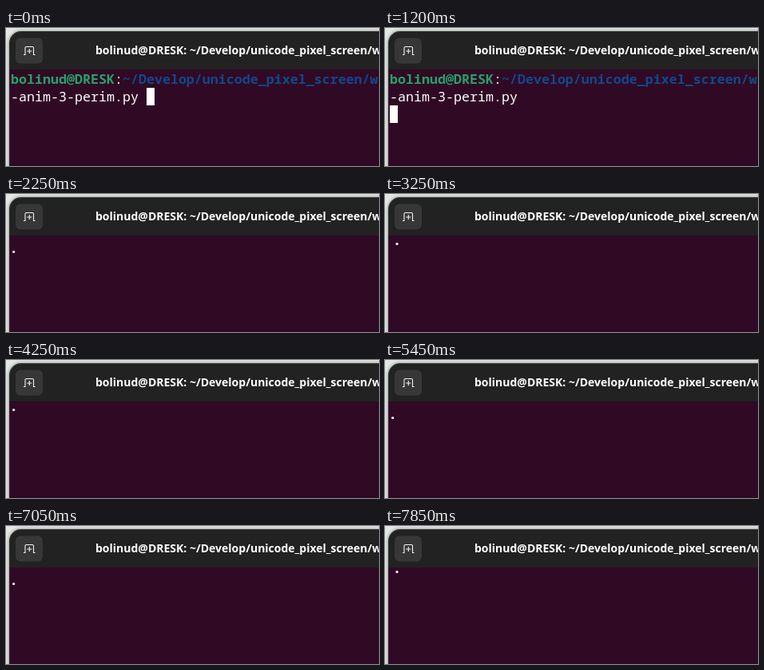
Animation of 467x173 px, one loop 8000 ms. Source, as an HTML page:

```html
<!DOCTYPE html>
<html lang="en">
<head>
<meta charset="utf-8">
<title>Terminal perimeter animation</title>
<style>
  html, body { margin: 0; width: 100%; height: 100%; overflow: hidden; background: #e3e8e5; }
  svg { display: block; width: 467px; height: 173px; }
  text { white-space: pre; fill: #fff; }
  .title { font: 700 14px "Noto Sans", "Open Sans", sans-serif; }
  .mono { font: 16.667px "Noto Sans Mono", "DejaVu Sans Mono", monospace; }
  .bold { font-weight: 700; }
  .user { fill: #26a269; }
  .path { fill: #12488b; }
  .window { filter: drop-shadow(0 0 2px rgba(0, 0, 0, .45)); }
</style>
</head>
<body>
<svg viewBox="0 0 467 173">
  <rect class="window" x="4" y="4" width="490" height="200" rx="15" fill="#222"/>
  <path d="M4 52H467V173H4z" fill="#300a24"/>
  <rect x="4.5" y="4.5" width="489" height="199" rx="14.5" fill="none" stroke="#fff" stroke-opacity=".08"/>
  <rect x="12" y="12.5" width="34" height="32" rx="6" fill="#373737"/>
  <path d="M22 33.5H24V25Q24 23.5 25.5 23.5H33Q34.5 23.5 34.5 25V33.5H36.5M26.3 29H32.3M29.3 26V32"
        fill="none" stroke="#f4f4f4" stroke-width="1.1"/>
  <text class="title" x="112" y="33">bolinud@DRESK: ~/Develop/unicode_pixel_screen/w</text>
  <g id="shell">
    <text class="mono" x="6" y="70"><tspan class="bold user">bolinud@DRESK</tspan>:<tspan class="bold path">~/Develop/unicode_pixel_screen/w</tspan></text>
    <text class="mono" x="6" y="92">-anim-3-perim.py</text>
    <rect id="cursor" width="10" height="22" fill="#fff"/>
  </g>
  <circle id="dot" r="1.6" fill="#fff"/>
</svg>
<script>
  const LOOP = 8000, ENTER = 1200, START = 1250, STEP = 200;
  const [shell, cursor, dot] = ["shell", "cursor", "dot"].map(id => document.getElementById(id));
  const show = (el, on) => el.setAttribute("visibility", on ? "inherit" : "hidden");
  const set = (el, attrs) => Object.entries(attrs).forEach(([k, v]) => el.setAttribute(k, v));

  // Clockwise around a 2 x 4 braille cell, from the top left
  function perimeter(i) {
    const right = i >= 1 && i <= 4;
    const row = right ? i - 1 : (8 - i) % 8;
    return { cx: right ? 15 : 9.6, cy: 57.5 + 5 * row };
  }

  function draw(t) {
    const running = t >= START, entered = t >= ENTER;
    show(shell, !running);
    show(cursor, t < 250 || t >= 850);
    set(cursor, entered ? { x: 6, y: 97 } : { x: 176, y: 75 });
    show(dot, running);
    if (running) set(dot, perimeter(Math.floor((t - START) / STEP) % 8));
  }

  const origin = performance.now();
  function frame() {
    draw((performance.now() - origin) % LOOP);
    requestAnimationFrame(frame);
  }
  frame();
</script>
</body>
</html>
```
